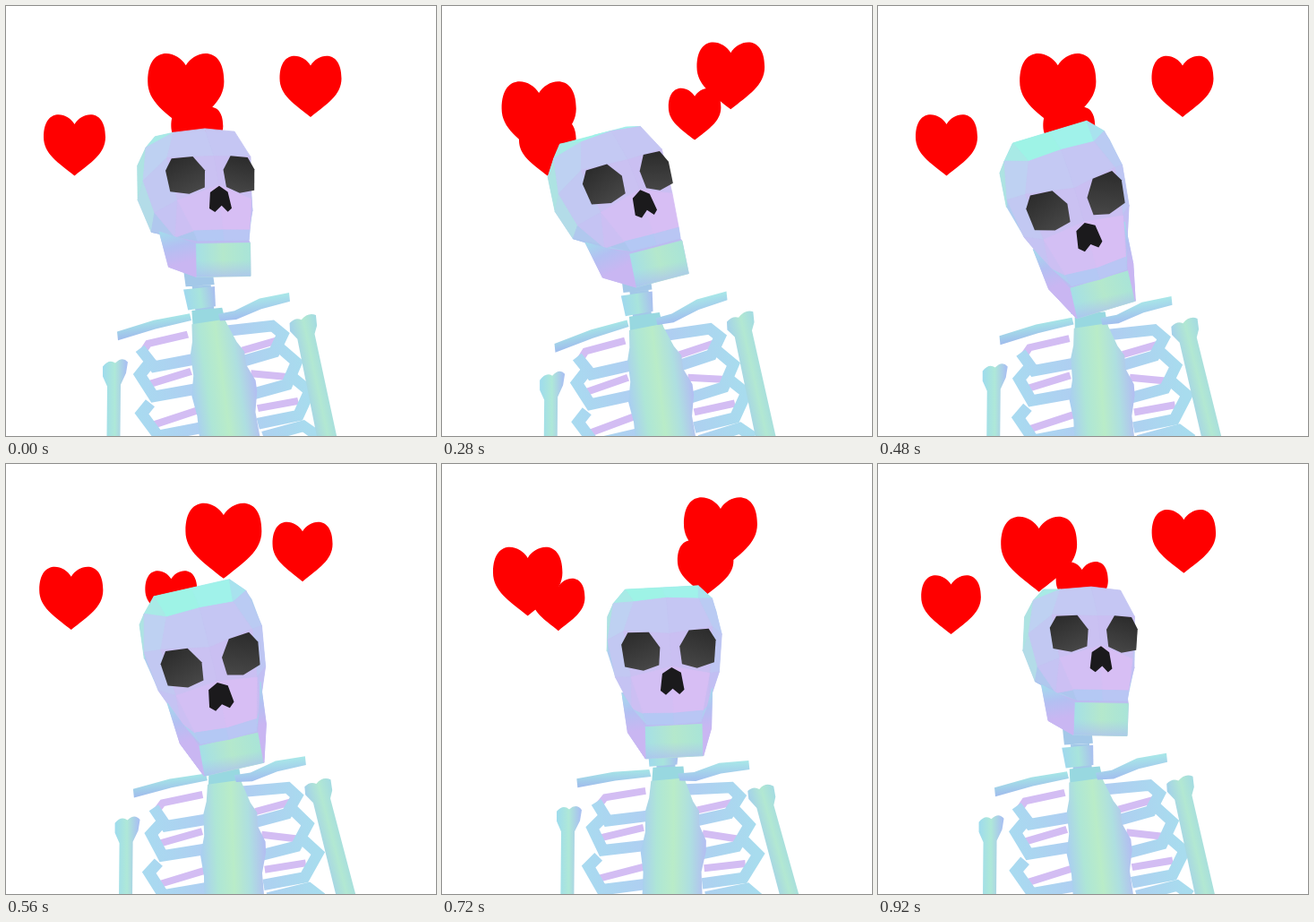
Recreate the animation shown at these times as an HTML page with a canvas. Size 480x480 px, loop 960 ms.

```html
<!DOCTYPE html>
<html lang="en">
<head>
<meta charset="utf-8">
<title>Skeleton in love</title>
<style>
html, body { margin: 0; width: 100%; height: 100%; overflow: hidden; background: #fff; }
canvas { display: block; width: 480px; height: 480px; }
</style>
</head>
<body>
<canvas id="stage" width="480" height="480"></canvas>
<script>
const ctx = document.getElementById('stage').getContext('2d');
const LOOP = 960, STEP = 40, TAU = Math.PI * 2;

// time, eye midpoint x/y, yaw, pitch, roll, scale, shoulder dx/dy, shoulder slope
const KEYS = [
  [0, 230.5, 188.5, 18.5, -14, -5.5, .94, -25, 1, -.138],
  [120, 208.5, 185, 20, -14, -16.5, .93, -26.5, 3.5, -.197],
  [280, 209.5, 192, 21.5, -6, -17, .96, -23.5, 7, -.217],
  [480, 222, 219.5, 7, 15, -15, 1.01, -13.5, 5.5, -.143],
  [640, 239, 216, 3.5, 13, -7.3, .99, -1.5, 2, -.059],
  [800, 264, 197.5, 7.5, -4, 1, .92, 0, 0, 0],
  [920, 243, 189.5, 16.5, -10, -2, .92, -19, 1.5, -.112]
];

function keyAt(i) {
  const n = KEYS.length, lap = Math.floor(i / n), row = KEYS[i - lap * n];
  return [row[0] + lap * LOOP, ...row.slice(1)];
}

// Smooth periodic spline through the keys
function poseAt(t) {
  const i = KEYS.findLastIndex(k => k[0] <= t);
  const [a, b, c, d] = [i - 1, i, i + 1, i + 2].map(keyAt);
  const span = c[0] - b[0], u = (t - b[0]) / span, v = 1 - u;
  return b.map((from, j) => {
    const m0 = (c[j] - a[j]) / (c[0] - a[0]) * span;
    const m1 = (d[j] - b[j]) / (d[0] - b[0]) * span;
    return (1 + 2 * u) * v * v * from + u * v * v * m0 + u * u * (3 - 2 * u) * c[j] - u * u * v * m1;
  });
}

function gradient(x0, y0, x1, y1, ...colors) {
  const g = ctx.createLinearGradient(x0, y0, x1, y1);
  colors.forEach((c, i) => g.addColorStop(i / (colors.length - 1), c));
  return g;
}

function shape(path, fill) {
  ctx.fillStyle = fill;
  ctx.fill(new Path2D(path));
}

function line(path, color, width) {
  ctx.strokeStyle = color;
  ctx.lineWidth = width;
  ctx.stroke(new Path2D(path));
}

function polygon(points, fill, edge) {
  ctx.beginPath();
  points.forEach(p => ctx.lineTo(p[0], p[1]));
  ctx.closePath();
  ctx.fillStyle = fill;
  ctx.fill();
  if (edge) {
    ctx.strokeStyle = fill;
    ctx.lineWidth = .8;
    ctx.lineJoin = 'round';
    ctx.stroke();
  }
}

// ---- hearts ----
const HEART = new Path2D('M0-23C-8-37-34.5-42-34.5-8.5C-34.5 10-18 20 0 34.5C18 20 34.5 10 34.5-8.5C34.5-42 8-37 0-23Z');

function drawHearts(t, front) {
  for (let i = 0; i < 4; i++) {
    const angle = TAU * (t / (2 * LOOP) + i / 4), depth = Math.cos(angle), side = Math.sin(angle);
    if (depth > 1e-6 !== front) continue;
    const near = 1 / (1 - .19 * depth);
    const size = near * (1 - .04 * side * Math.sin(TAU * t / LOOP));
    ctx.save();
    ctx.translate(240 + near * (131.75 * side - 31.75), 240 - near * (117.75 + 32.75 * side));
    ctx.scale(size, size);
    ctx.fillStyle = '#f00';
    ctx.fill(HEART);
    ctx.restore();
  }
}

// ---- body ----
const RIBS_BACK = [
  'M226 364L181 371L172 382', 'M224 405L176 416', 'M224 449L172 462',
  'M284 386L326 377', 'M290 412L332 419', 'M292 451L338 446'
];
const RIBS_FRONT = [
  'M171 376L184 397L228 392', 'M178 394L167 405L179 430L226 425', 'M174 437L163 448L178 474L228 468',
  'M270 363L321 361L331 371L319 390L282 398', 'M326 386L342 403L328 427L288 435',
  'M336 420L352 436L336 462L290 468', 'M294 483L340 474L354 486'
];

function drawArm(path, dx, dy, slope, swing, fill) {
  ctx.save();
  ctx.translate(246 + dx, 345 + dy);
  ctx.transform(1, slope, swing, 1, 0, 0);
  ctx.translate(-246, -345);
  shape(path, fill);
  ctx.restore();
}

function drawBody(dx, dy, slope) {
  const bone = gradient(160, 0, 350, 0, '#a9daf0', '#b1caf2', '#a8dcee');
  ctx.save();
  ctx.translate(250 + dx, 350 + dy);
  ctx.transform(1, slope / 2, -.0055 * dx, 1, 0, 0);
  ctx.translate(-250, -350);
  ctx.lineJoin = 'miter';
  RIBS_BACK.forEach(r => line(r, '#d3bdf3', 8));
  RIBS_FRONT.forEach(r => line(r, bone, 12.5));
  shape('M231 288H263V311H231ZM238 311H259V350H238Z', '#a3c8e8');
  shape('M228 314L263 313L261 335L230 337Z', gradient(228, 0, 263, 0, '#9fd8ee', '#a8e4dc', '#a9bdf0'));
  shape('M234 338L268 337L270 354L233 354Z', '#98d8e0');
  shape('M232 353L269 350L279 376L286 387L286 402L294 420L294 432L289 455L292 520H222L224 455L221 432L226 410L226 386L230 372Z',
    gradient(221, 0, 294, 0, '#a9cdf2', '#aee6d6', '#b9ecc8', '#aedfe0', '#b3bdf2'));
  ctx.restore();

  ctx.save();
  ctx.translate(246 + dx, 345 + dy);
  ctx.transform(1, slope, 0, 1, 0, 0);
  ctx.translate(-246, -345);
  shape('M149 349L190 342L230 340L232 348L192 352L150 359Z', gradient(0, 340, 0, 358, '#a5e6e6', '#a0bdec'));
  shape('M262 345L280 344L308 334L341 332L342 342L310 346L282 354L264 353Z', gradient(0, 333, 0, 353, '#a8e6e8', '#a2c0ee'));
  ctx.restore();

  drawArm('M127 385Q134 377 141 383Q149 376 155 384L153 396L147 408L146 520H131L132 408L127 396Z',
    dx * .76, dy, slope, 0, gradient(128, 0, 153, 0, '#9fdcec', '#aee8d8', '#a9c2f0'));
  drawArm('M340 366Q346 360 353 364Q360 356 369 361L371 373L369 382L407 520H385L350 385L341 375Z',
    dx * .88, dy, slope, -.0027 * dx * -1, gradient(345, 400, 382, 390, '#a0ccee', '#b2e8d2', '#9ed6e8'));
}

// ---- head: half of a symmetric mesh, lower case lies on the mirror plane ----
const V = {
  A: [43, -67, -72], B: [38, -57, -16], C: [58, -52, -65], D: [67, -10, -60], E: [61, 33, -47],
  G: [45, 69, -27], H: [64, -35, -85], I: [66, 6, -90], J: [45, 39, -114], K: [32, -45, -120],
  M: [35, 72, 14], N: [32, 85, 17], O: [52, -24, -8], Q: [46, 30, -2],
  a: [0, -67, -72], c: [0, -60, -12], p: [0, -20, 12], q: [0, 18, 20], m: [0, 73, 20], n: [0, 86, 21],
  R: [53, 53, -60], S: [49, 99, -50], T: [34, 88, 14], U: [34, 126, 4]
};
// face, right colour, left colour
const SKULL = [
  ['AKHC', '#a6e8e6', '#a8ebde'], ['CHID', '#a9d8ee', '#ade3e2'], ['DIJE', '#aacdf0', '#b3dce8'],
  ['EJG', '#a9c3ee', '#b0c8ee'], ['GJNM', '#a9bdec', '#adc6ee'], ['aABc', '#a0f2ea', '#9ef3e6'],
  ['ACB', '#a8e2ee', '#a8eae6'], ['BCDO', '#bacbf3', '#bed1f2'], ['cBOp', '#c5c6f3', '#c4c9f3'],
  ['ODEQ', '#bec6f3', '#c2c8f2'], ['pOQq', '#cabff2', '#cac1f2'], ['QEG', '#c2bff3', '#c5c3f3'],
  ['QGM', '#cabcf2', '#ccbff3'], ['qQMm', '#d7bef4', '#d3bff4'], ['mMNn', '#b9c6f4', '#b4c8f4']
];
const CRANIUM = 'ABCDEGHIJKMN', JAW = 'RSTU';
const EYE = [[22, -8], [14, -22], [-10, -22], [-22, -4], [-20, 17], [-2, 23], [19, 18]];
const NOSE = [[0, 19, 21], [11, 26, 18], [14, 46, 18], [8, 51, 20], [0, 44, 23], [-8, 51, 20], [-14, 46, 18], [-11, 26, 18]];

function projector([, ox, oy, ...rest]) {
  const [yaw, pitch, roll] = rest.map(d => d * TAU / 360), scale = rest[3];
  return ([X, Y, Z]) => {
    const x = X * Math.cos(yaw) + Z * Math.sin(yaw), z = Z * Math.cos(yaw) - X * Math.sin(yaw);
    const y = Y * Math.cos(pitch) + z * Math.sin(pitch);
    return [
      ox + scale * (x * Math.cos(roll) - y * Math.sin(roll)),
      oy + scale * (x * Math.sin(roll) + y * Math.cos(roll))
    ];
  };
}

const cross = (o, a, b) => (a[0] - o[0]) * (b[1] - o[1]) - (a[1] - o[1]) * (b[0] - o[0]);

function hull(points) {
  const chain = list => list.reduce((h, p) => {
    while (h.length > 1 && cross(h.at(-2), h.at(-1), p) <= 0) h.pop();
    return [...h, p];
  }, []).slice(0, -1);
  const sorted = points.slice().sort((a, b) => a[0] - b[0] || a[1] - b[1]);
  return [...chain(sorted), ...chain(sorted.slice().reverse())];
}

const area = pts => pts.reduce((sum, p, i) => {
  const q = pts[(i + 1) % pts.length];
  return sum + p[0] * q[1] - p[1] * q[0];
}, 0);

function drawHead(pose) {
  const project = projector(pose);
  const at = (name, side) => project([V[name][0] * side, V[name][1], V[name][2]]);
  const face = (names, side) => [...names].map(n => at(n, side));
  const outline = names => hull([...face(names, -1), ...face(names, 1)]);

  // jaw
  const chin = [at('T', -1), at('T', 1), at('U', 1), at('U', -1)];
  const [left, right, , base] = chin;
  polygon(outline(JAW), '#bcbcf1', true);
  polygon(chin, gradient(...left, ...right, '#a5dfe6', '#b4e8cc', '#a9e4d8'), true);
  polygon(chin, gradient(...left, ...base, '#aec0f200', '#aec0f200', '#aebcf2b0'));

  // cranium
  polygon(outline(CRANIUM), '#b0cdf0');
  for (const [names, rightColor, leftColor] of SKULL) {
    for (const side of [-1, 1]) {
      const pts = face(names, side);
      if (area(pts) * side > 0) polygon(pts, side > 0 ? rightColor : leftColor, true);
    }
  }

  // jaw sides
  for (const side of [-1, 1]) {
    const pts = face('TRSU', side);
    if (area(pts) * side > 0) polygon(pts, gradient(...pts[1], ...pts[2], '#a3dcec', '#b3c0f2', '#c9b6f2'), true);
  }

  // sockets
  for (const side of [-1, 1]) {
    const eye = EYE.map(([x, y]) => project([side * (33.5 + x), y, -.35 * x]));
    polygon(eye, gradient(...eye[1], ...eye[5], '#2b2b2b', '#464646'));
  }
  polygon(NOSE.map(project), '#1b1a1c');
}

function draw(now) {
  const t = Math.floor(now / STEP) * STEP % LOOP, pose = poseAt(t);
  ctx.fillStyle = '#fff';
  ctx.fillRect(0, 0, 480, 480);
  drawHearts(t, false);
  drawBody(...pose.slice(7));
  drawHead(pose);
  drawHearts(t, true);
  requestAnimationFrame(tick);
}

const start = performance.now();
function tick() { draw(performance.now() - start); }
tick();
</script>
</body>
</html>
```
